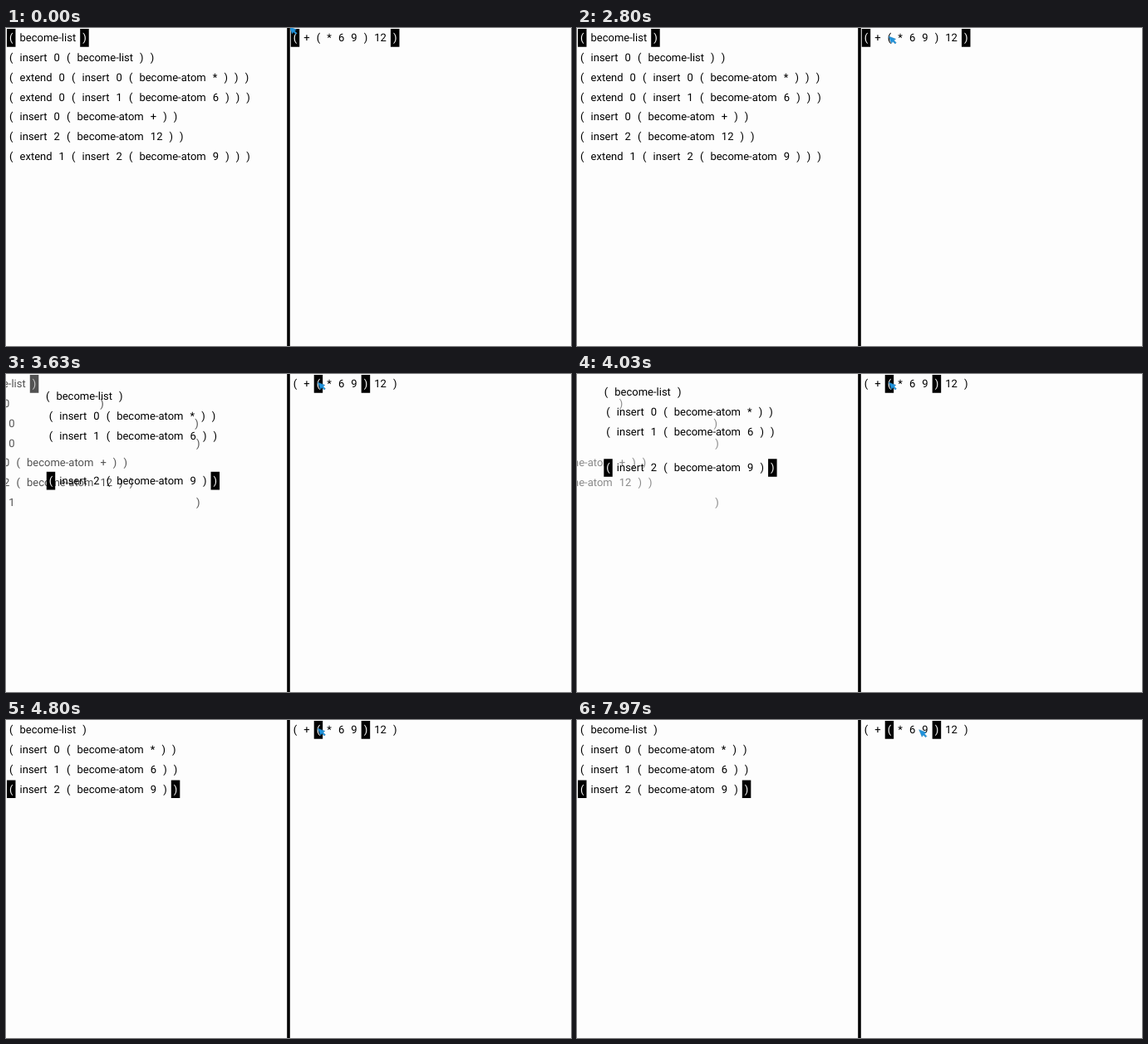
An HTML page with a canvas for the animation above (8 s loop, 680 by 383 pixels).

```html
<!DOCTYPE html>
<html>
<head>
<meta charset="utf-8">
<style>
html, body { margin: 0; width: 100%; height: 100%; overflow: hidden; background: #fdfdfd; }
canvas { display: block; }
</style>
</head>
<body>
<canvas id="stage" width="680" height="383"></canvas>
<script>
const ctx = document.getElementById('stage').getContext('2d');
const LOOP = 8000, PITCH = 23.77, BASE = 16.35, GAP = 8.07, PAD = 3;
const MOVE_START = 2970, MOVE_END = 4790;

ctx.font = '13px Roboto, sans-serif';
ctx.textRendering = 'geometricPrecision';
// A hair of skew keeps baselines from snapping to whole pixels.
ctx.setTransform(1, 0.00001, 0, 1, 0, 0);

// Splits a line into tokens and gives each its left edge and width.
function layout(text, x = GAP / 2) {
  return text.split(' ').map(s => {
    const w = ctx.measureText(s).width;
    const token = { s, x, w };
    x += w + GAP;
    return token;
  });
}

const before = [
  '( become-list )',
  '( insert 0 ( become-list ) )',
  '( extend 0 ( insert 0 ( become-atom * ) ) )',
  '( extend 0 ( insert 1 ( become-atom 6 ) ) )',
  '( insert 0 ( become-atom + ) )',
  '( insert 2 ( become-atom 12 ) )',
  '( extend 1 ( insert 2 ( become-atom 9 ) ) )'
].map(text => layout(text));
const kept = [1, 2, 3, 6];  // lines whose inner list survives
const right = layout('( + ( * 6 9 ) 12 )', 345.75);

function drawToken({ s, x, w }, dx, y, marked) {
  ctx.fillStyle = '#000';
  if (marked) {
    ctx.fillRect(x + dx - PAD, y - BASE + 1.1, w + 2 * PAD, PITCH - 2.1);
    ctx.fillStyle = '#fff';
  }
  ctx.fillText(s, x + dx, y);
}

function drawLine(tokens, dx, y, marks = []) {
  tokens.forEach(token => drawToken(token, dx, y, marks.includes(token)));
}

const ends = tokens => [tokens[0], tokens[tokens.length - 1]];
const mix = (a, b, k) => a + (b - a) * k;
const lineY = i => BASE + i * PITCH;

function drawLeft(p) {
  if (p < 1) {
    ctx.globalAlpha = 1 - p ** 1.12;
    const shift = -(138 * p + 215 * p ** 3);
    before.forEach((line, i) => {
      const rest = p > 0 && kept.includes(i) ? [...line.slice(0, 3), line[line.length - 1]] : line;
      drawLine(rest, shift, lineY(i), i ? [] : ends(line));
    });
    ctx.globalAlpha = 1;
  }
  if (p > 0) kept.forEach((from, to) => {
    const inner = before[from].slice(3, -1);
    const dx = (GAP / 2 - inner[0].x) * p;
    drawLine(inner, dx, mix(lineY(from), lineY(to), p), to === 3 ? ends(inner) : []);
  });
}

// Pointer moves: start, end, then the tip reached.
const start = [341, -1.5];
const moves = [
  [0, 770, 346.5, 9.3], [2070, 2430, 372.8, 9.5], [2670, 2830, 375.2, 10],
  [6440, 7230, 400.5, 11.3], [7540, 7970, 411.7, 11.7]
];
const arrow = new Path2D('M0 0L8.6 3.4L6.4 4.9L9.2 7.8L7.9 9.1L5 6.3L3.5 8.6Z');

function drawPointer(t) {
  let [x, y] = start;
  for (const [a, b, tx, ty] of moves) {
    const u = Math.min(1, Math.max(0, (t - a) / (b - a)));
    const k = u * u * (3 - 2 * u);
    x = mix(x, tx, k);
    y = mix(y, ty, k);
  }
  ctx.save();
  ctx.beginPath();
  ctx.rect(342, 0, 338, 383);
  ctx.clip();
  ctx.translate(x, y);
  ctx.fillStyle = '#1f93dc';
  ctx.strokeStyle = '#287bb0';
  ctx.lineWidth = 0.5;
  ctx.fill(arrow);
  ctx.stroke(arrow);
  ctx.restore();
}

function frame(now) {
  const t = now % LOOP;
  const p = Math.min(1, Math.max(0, (t - MOVE_START) / (MOVE_END - MOVE_START)));
  ctx.fillStyle = '#fdfdfd';
  ctx.fillRect(-1, -1, 682, 385);
  drawLeft(p);
  ctx.fillStyle = '#000';
  ctx.fillRect(338.2, -1, 3.6, 385);
  drawLine(right, 0, BASE, p > 0 ? [right[2], right[6]] : ends(right));
  drawPointer(t);
}

const origin = performance.now();
function tick() {
  frame(performance.now() - origin);
  requestAnimationFrame(tick);
}
tick();
</script>
</body>
</html>
```
